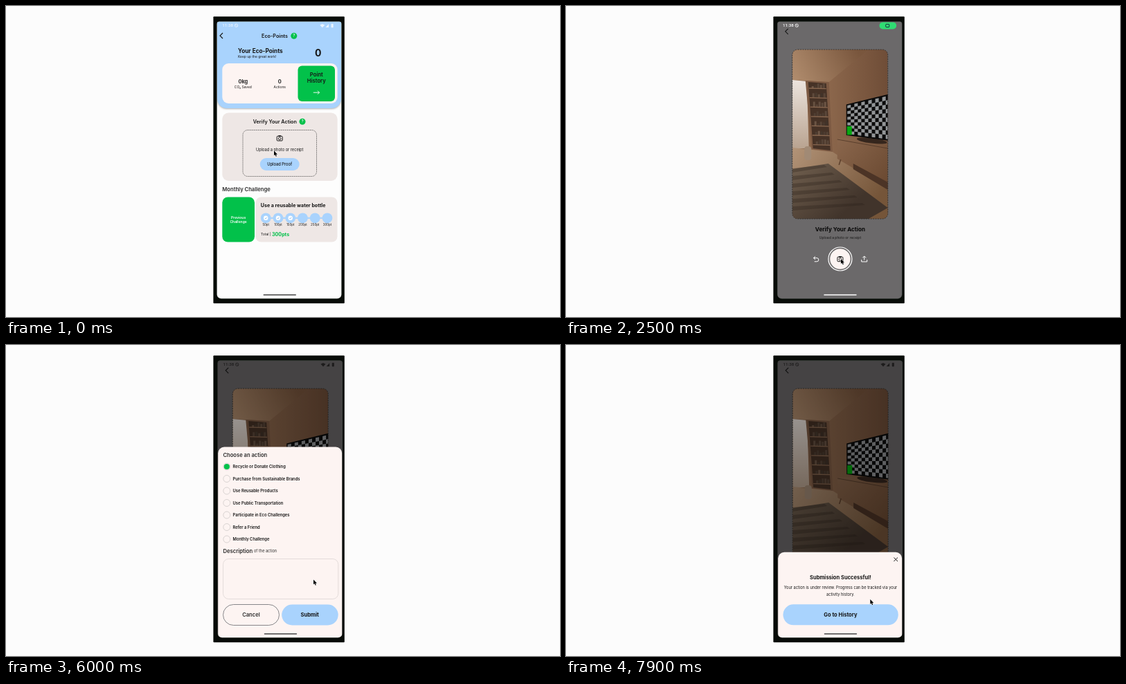
An HTML page with a canvas that plays this animation: 800 px wide and 450 px high, repeating every 8000 ms.

```html
<!DOCTYPE html>
<html lang="en">
<head>
<meta charset="utf-8">
<title>Eco-Points</title>
<style>
html, body { margin: 0; width: 100%; height: 100%; overflow: hidden; background: #fcfcfc; }
canvas { display: block; width: 800px; height: 450px; }
</style>
</head>
<body>
<canvas id="stage"></canvas>
<script>
const LOOP = 8000;
const canvas = document.getElementById('stage');
const c = canvas.getContext('2d');
const ratio = window.devicePixelRatio || 1;
canvas.width = 800 * ratio;
canvas.height = 450 * ratio;

const BLUE = '#a9d3fd', GREEN = '#02c14a', CREAM = '#fdf4f2', CARD = '#eee7e5', INK = '#161616', GREY = '#2c2c2c';
const LEFT = 312.3, MID = 395.2, WIDE = 166.3;   // content column of the phone screen

const clamp = v => Math.max(0, Math.min(1, v));
const ease = v => v * v * (3 - 2 * v);
const ramp = (t, a, b) => ease(clamp((t - a) / (b - a)));
const mix = (a, b, k) => a + (b - a) * k;

function random(seed) {
  return () => (seed = (seed * 16807) % 2147483647) / 2147483647;
}

// ---- drawing helpers ----
function paint(fill, stroke, lw) {
  if (fill) { c.fillStyle = fill; c.fill(); }
  if (stroke) { c.strokeStyle = stroke; c.lineWidth = lw; c.stroke(); }
}

function box(x, y, w, h, r, fill, stroke, lw = 0.6) {
  c.beginPath();
  c.roundRect(x, y, w, h, r);
  paint(fill, stroke, lw);
}

function disc(x, y, r, fill, stroke, lw = 0.6) {
  c.beginPath();
  c.arc(x, y, r, 0, 7);
  paint(fill, stroke, lw);
}

function trace(p) {
  c.beginPath();
  for (let i = 0; i < p.length; i += 2) c.lineTo(p[i], p[i + 1]);
}

function poly(fill, ...p) {
  trace(p);
  paint(fill);
}

function line(color, lw, ...p) {
  trace(p);
  paint(null, color, lw);
}

function text(s, x, y, size, weight = 400, align = 'center', color = INK) {
  c.font = `${weight} ${size}px Inter, sans-serif`;
  c.textAlign = align;
  c.fillStyle = color;
  c.fillText(s, x, y + size * 0.36);
}

function shade(x0, y0, x1, y1, from, to) {
  const g = c.createLinearGradient(x0, y0, x1, y1);
  g.addColorStop(0, from);
  g.addColorStop(1, to);
  return g;
}

// ---- icons ----
function chevron(x, y, r, dir, color = INK, lw = 1.1) {
  line(color, lw, x - dir * r, y - r, x, y, x - dir * r, y + r);
}

function cameraIcon(x, y) {
  box(x - 4, y - 2.9, 8, 6.6, 1, null, INK, 1);
  box(x - 2, y - 4, 4, 1.4, 0.4, INK);
  disc(x, y + 0.5, 1.8, null, INK, 0.9);
}

function help(x, y) {
  disc(x, y, 4.5, GREEN);
  text('?', x, y, 6, 500, 'center', '#fff');
}

function statusBar(color, alpha, pill) {
  c.save();
  c.globalAlpha *= alpha;
  c.font = '500 6.2px Roboto, sans-serif';
  c.textAlign = 'left';
  c.fillStyle = color;
  c.fillText('11:38', LEFT, 30.4);
  disc(332.5, 28.2, 2.2, null, color, 0.8);
  line(color, 0.7, 331, 26.8, 334, 29.7);
  c.globalAlpha = alpha * (1 - pill);
  poly(color, 453.3, 27.4, 456.8, 25.9, 460.3, 27.4, 456.8, 31.3);
  poly(color, 461.5, 31, 466, 31, 466, 26);
  box(469.6, 25.8, 3, 5.4, 0.6, color);
  c.globalAlpha = pill;
  box(451.8, 23.4, 24.6, 10, 5, '#2fdc72');
  box(461, 26.4, 5, 4.2, 0.8, null, '#103', 0.8);
  c.restore();
}

function navBar(color) {
  box(371.5, 417.2, 47.5, 1.6, 0.8, color);
}

// ---- home page ----
function header() {
  c.save();
  c.shadowColor = 'rgba(0,0,0,.3)';
  c.shadowBlur = 2.5 * ratio;
  c.shadowOffsetY = ratio;
  box(305, 18, 179, 130, [0, 0, 14, 14], BLUE);
  c.restore();
  statusBar('#fff', 0.75, 0);
  chevron(309, 43, 4, -1);
  text('Eco-Points', 388, 43.3, 7.2, 600);
  help(415.8, 43.2);
  text('Your Eco-Points', 335, 65.2, 8.25, 700, 'left');
  text('Keep up the great work!', 335, 73.3, 4.9, 400, 'left');
  text('0', 450.7, 68.4, 14, 700);

  box(LEFT, 83, WIDE, 58, 9, CREAM);
  [['0kg', 'CO₂ Saved', 342.3], ['0', 'Actions', MID]].forEach(([value, label, x]) => {
    text(value, x, 109, 7.4, 700, 'center', GREY);
    text(label, x, 117, 4.9);
  });
  box(421.5, 86.5, 53.5, 51.5, 6, GREEN);
  text('Point', 448.3, 99, 7.7, 600);
  text('History', 448.3, 108, 7.7, 600);
  line('#fff', 0.9, 443.8, 125.2, 452.5, 125.2);
  chevron(452.5, 125.2, 2.5, 1, '#fff', 0.9);
}

function homePage() {
  c.fillStyle = '#fdfdfd';
  c.fillRect(304, 22, 182, 402);
  header();

  box(LEFT, 154.5, WIDE, 98.5, 9, CARD);
  text('Verify Your Action', 388.3, 167.3, 7.2, 600);
  help(428, 167.2);
  c.setLineDash([1, 0.5]);
  box(342, 179.5, 106.5, 67, 7, null, GREY);
  c.setLineDash([]);
  cameraIcon(MID, 191.3);
  text('Upload a photo or receipt', MID, 207.8, 5.7);
  box(366.7, 220, 57, 18, 9, BLUE);
  text('Upload Proof', MID, 229, 5.75, 500);

  text('Monthly Challenge', LEFT, 265, 7.65, 600, 'left', GREY);
  box(LEFT, 276.5, 46.7, 65, 8, GREEN);
  text('Previous', 335.6, 306.4, 5, 600, 'center', '#fff');
  text('Challenge', 335.6, 311.8, 5, 600, 'center', '#fff');
  box(360.5, 276.5, 118, 65, 8, CARD);
  text('Use a reusable water bottle', 367.8, 288, 7.05, 700, 'left');
  c.fillStyle = BLUE;
  c.fillRect(375, 305.7, 89, 2.2);
  for (let i = 0; i < 6; i++) {
    const x = 375.2 + i * 17.75;
    disc(x, 306.8, 7.4, BLUE);
    if (i < 3) {
      disc(x, 306.8, 3.2, '#fff');
      line('#7db4e8', 0.8, x - 1.4, 306.9, x - 0.3, 308, x + 1.5, 305.7);
    }
    text((i + 1) * 50 + 'pt', x, 316.3, 4.4);
  }
  text('Total |', 368, 330.2, 5, 400, 'left');
  text('300pts', 384, 330, 7.1, 700, 'left', GREEN);
  navBar('#444');
}

// ---- room seen by the camera ----
function television() {
  const cols = 12, rows = 10;
  const at = (u, v) => [mix(405.5, 466, u), mix(mix(144, 129.5, u), mix(185, 193, u), v)];
  poly('#0b0b0b', 404, 142.5, 467, 127, 467, 195, 404, 187);
  for (let i = 0; i < cols; i++) for (let j = i % 2; j < rows; j += 2) {
    const l = i / cols, r = (i + 1) / cols, t = j / rows, b = (j + 1) / rows;
    poly('#929597', ...at(l, t), ...at(r, t), ...at(r, b), ...at(l, b));
  }
  box(405, 174, 7, 12.5, 0, '#08a812');
}

function bookshelf() {
  const rnd = random(7);
  poly('#7d5a43', 345, 108, 379, 110, 384, 211, 354, 207);
  poly('#463226', 349, 110, 375, 112, 381, 209, 356, 206);
  for (let i = 0; i < 7; i++) {
    const x = 350 + i, y = 119 + i * 13.6;
    for (let k = 1; k < 6; k++) {
      const h = 3 + rnd() * 5;
      box(x + k * 4, y - h, 3, h, 0, `hsl(25 22% ${20 + rnd() * 16}%)`);
    }
    line('#8a6850', 1.3, x, y, x + 25, y + 0.7);
  }
}

function room() {
  c.save();
  c.beginPath();
  c.roundRect(326, 63, 138, 245, 8);
  c.clip();
  c.fillStyle = shade(378, 0, 464, 0, '#8c674c', '#6f4d37');
  c.fillRect(326, 63, 138, 245);
  // ceiling and window
  poly(shade(420, 63, 330, 110, '#79563d', '#b08c6d'), 326, 63, 436, 63, 379, 110, 326, 107);
  poly(shade(0, 107, 0, 206, '#ece4de', '#b9a390'), 326, 107, 347, 109, 350, 206, 326, 206);
  bookshelf();
  // floor, rug and the light across it
  poly(shade(326, 206, 440, 290, '#b39478', '#755539'), 326, 205, 384, 211, 464, 262, 464, 308, 326, 308);
  poly(shade(330, 222, 400, 300, '#71604f', '#41342b'), 326, 236, 378, 228, 464, 292, 436, 308, 326, 308);
  for (let i = 0; i < 6; i++) {
    const y = 235 + i * 11;
    poly('rgba(40,30,24,.3)', 326, y, 372 + i * 11, y - 5, 376 + i * 11, y - 2, 326, y + 6);
  }
  // vase
  box(343.5, 203, 10, 20, 4, '#a18a75');
  // cabinet
  poly(shade(391, 195, 464, 262, '#8a664c', '#694830'), 391, 192, 412, 190, 464, 197, 464, 264, 391, 221);
  line('#4f3626', 0.8, 391, 193, 464, 206);
  poly('#4c3426', 414, 228, 464, 255, 464, 266, 414, 236);
  line('#5e412d', 1.6, 396, 222, 393.5, 230);
  // stand
  c.beginPath();
  c.ellipse(441, 195, 22, 3.6, 0.12, 0, 7);
  paint('#35261d');
  television();
  c.restore();
}

// ---- camera page ----
function cameraPage(t, dim) {
  c.fillStyle = '#6b696a';
  c.fillRect(300, 18, 190, 410);
  c.save();
  c.globalAlpha *= ramp(t, 1000, 1150);
  room();
  c.restore();
  c.setLineDash([2, 1.4]);
  box(326, 63, 138, 245, 8, null, GREY, 0.8);
  c.setLineDash([]);
  chevron(316, 36.8, 4, -1);
  text('Verify Your Action', MID, 323.5, 8.15, 700, 'center', '#080808');
  text('Upload a photo or receipt', MID, 335.2, 5);
  disc(MID, 366, 17, null, '#fff', 1.2);
  disc(MID, 366, 14.7, CREAM);
  cameraIcon(MID, 366);
  if (t > 2500) {
    // retake
    chevron(356.8, 364.6, 2.4, -1, '#fff', 1);
    c.beginPath();
    c.moveTo(356.8, 364.6);
    c.arc(361.5, 367.2, 2.6, -Math.PI / 2, Math.PI / 2);
    c.lineTo(358, 369.8);
    c.stroke();
    // send
    line('#fff', 1, 430, 367.5, 430, 362.2);
    line('#fff', 1, 427.5, 364.4, 430, 361.9, 432.5, 364.4);
    line('#fff', 1, 426, 367, 426, 370, 434, 370, 434, 367);
  }
  navBar('#fff');
  c.fillStyle = `rgba(0,0,0,${0.36 * dim})`;
  c.fillRect(300, 18, 190, 410);
  const pill = ramp(t, 1100, 1200) * (1 - ramp(t, 2750, 2900));
  statusBar(dim > 0.4 ? '#1d1c1c' : '#fff', 1, pill);
}

// ---- bottom sheet ----
const ACTIONS = ['Recycle or Donate Clothing', 'Purchase from Sustainable Brands', 'Use Reusable Products',
  'Use Public Transportation', 'Participate in Eco Challenges', 'Refer a Friend', 'Monthly Challenge'];

function form(t) {
  text('Choose an action', LEFT, 159, 7.6, 600, 'left', GREY);
  ACTIONS.forEach((label, i) => {
    const y = 176 + i * 17.5;
    disc(317.6, y, 5, null, '#c9c4c3', 0.7);
    if (i === 0 && t >= 4600) disc(317.6, y, 4.1, GREEN);
    text(label, 326.3, y, 5.83, 600, 'left');
  });
  text('Description', LEFT, 298, 7.65, 600, 'left', GREY);
  text('of the action', 356.8, 298.4, 5.6, 400, 'left', GREY);
  box(LEFT, 309.5, WIDE, 58, 8, null, '#d8d2d0', 0.7);
  box(LEFT, 375.5, 81, 30, 15, null, '#55585e', 0.7);
  text('Cancel', 352.7, 390.4, 7.6, 600, 'center', GREY);
  box(397, 375.5, 81.5, 30, 15, BLUE);
  text('Submit', 437.5, 390.4, 7.65, 700);
}

function success() {
  chevron(475, 158, 2.8, 1, INK, 1);
  chevron(475, 158, 2.8, -1, INK, 1);
  text('Submission Successful!', MID, 183.7, 7.55, 700);
  text('Your action is under review. Progress can be tracked via your', MID, 199, 5.66);
  text('activity history.', MID, 208.8, 5.66);
  box(LEFT, 223, WIDE, 30, 15, BLUE);
  text('Go to History', MID, 238, 7.55, 700);
}

function sheet(t) {
  const rise = 1 - Math.pow(1 - clamp((t - 3650) / 350), 3);
  c.save();
  c.translate(0, 280 * (1 - rise) + 152.3 * ramp(t, 7220, 7780));
  box(305, 147.5, 179, 290, [9, 9, 0, 0], CREAM);
  if (t < 6750) form(t); else success();
  c.restore();
  navBar('#444');
}

// ---- pointer: it reaches each stop at the given time, moving for at most 700 ms ----
const STOPS = [[0, 387, 209.5], [900, 397, 230], [2200, 397, 366], [3400, 434, 368], [4100, 370, 195.5],
  [4400, 319, 175], [6000, 444, 339.5], [6500, 436.5, 391.5], [7900, 439.3, 368]];
const ARROW = new Path2D('M0 0V7L1.6 5.6 2.7 8.2 3.9 7.7 2.8 5.2H5Z');

function pointer(t) {
  let [, x, y] = STOPS[0];
  for (const [end, px, py] of STOPS.slice(1)) {
    const prev = STOPS[STOPS.findIndex(s => s[0] === end) - 1][0];
    const k = ramp(t, Math.max(prev, end - 700), end);
    x = mix(x, px, k);
    y = mix(y, py, k);
  }
  c.save();
  c.translate(x, y);
  c.strokeStyle = 'rgba(255,255,255,.85)';
  c.lineWidth = 1;
  c.stroke(ARROW);
  c.fillStyle = '#000';
  c.fill(ARROW);
  c.restore();
}

function draw(t) {
  c.setTransform(ratio, 0, 0, ratio, 0, 0);
  c.fillStyle = '#fcfcfc';
  c.fillRect(0, 0, 800, 450);
  box(299.4, 15.3, 189.4, 415, 1, '#080c08');
  c.save();
  c.translate(1.2 * clamp((t - 1400) / 1800), 0);
  box(304.7, 22.7, 179.6, 400.6, [3, 3, 6, 6], null, '#3a423b', 0.8);
  c.clip();
  const open = ramp(t, 720, 920);
  if (open < 1) homePage();
  if (open > 0) {
    c.globalAlpha = open;
    cameraPage(t, ramp(t, 3620, 3850));
    c.globalAlpha = 1;
  }
  if (t > 3650) sheet(t);
  c.restore();
  pointer(t);
}

const start = performance.now();
function tick() {
  draw((performance.now() - start) % LOOP);
  requestAnimationFrame(tick);
}
tick();
</script>
</body>
</html>
```
